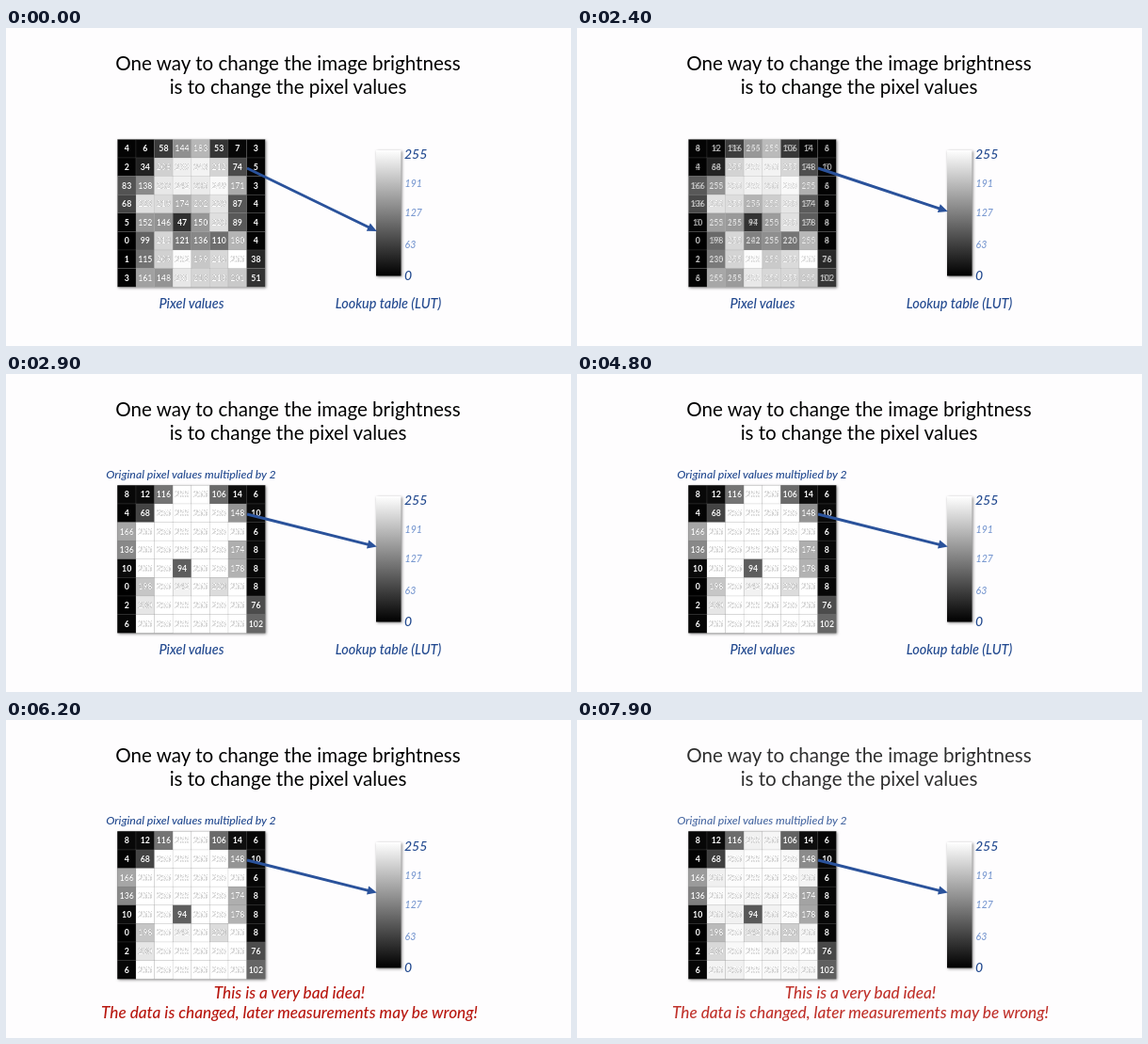
An HTML page for the animation above (8 s loop, 600 by 338 pixels).

```html
<!DOCTYPE html>
<html lang="en">
<head>
<meta charset="utf-8">
<title>Changing pixel values</title>
<style>
  html, body { margin: 0; width: 100%; height: 100%; overflow: hidden; background: #fefdfe; }
  svg { display: block; width: 100vw; height: 100vh; font-family: Lato, "Open Sans", sans-serif; text-anchor: middle; }
  .title { font-size: 20.6px; fill: #000; }
  .blue { font-style: italic; font-weight: 500; fill: #22498f; }
  .caption { font-size: 14.45px; }
  .note { font-size: 12.3px; }
  .scale { text-anchor: start; }
  .end { font-size: 14px; }
  .mid { font-size: 10.6px; fill: #7898d0; }
  .warn { font-size: 17.2px; font-style: italic; font-weight: 500; fill: #b8170f; }
  .digits { font-size: 8.8px; font-weight: 700; fill: #fff; filter: drop-shadow(.4px .6px .6px rgba(0, 0, 0, .7)); }
  .box { filter: drop-shadow(1px 1.5px 1.5px rgba(0, 0, 0, .5)); }
</style>
</head>
<body>
<svg viewBox="0 0 600 338" xmlns="http://www.w3.org/2000/svg">
  <defs>
    <linearGradient id="ramp" x1="0" y1="0" x2="0" y2="1">
      <stop offset="0" stop-color="#fff"/>
      <stop offset="1" stop-color="#000"/>
    </linearGradient>
  </defs>
  <g id="title" class="title">
    <text x="299.5" y="45">One way to change the image brightness</text>
    <text x="299.5" y="69.5">is to change the pixel values</text>
  </g>
  <text id="note" class="blue note" x="196.5" y="110.7">Original pixel values multiplied by 2</text>
  <rect class="box" x="118.4" y="118.4" width="156.8" height="156.8" fill="#fff"/>
  <g id="grid"></g>
  <rect class="box" x="393" y="130" width="26.5" height="133.5" fill="url(#ramp)"/>
  <g class="blue scale">
    <text class="end" x="423" y="138.5">255</text>
    <text class="mid" x="423.5" y="169">191</text>
    <text class="mid" x="423.5" y="200">127</text>
    <text class="mid" x="423.5" y="234">63</text>
    <text class="end" x="423" y="267.5">0</text>
  </g>
  <g id="labels" class="blue caption">
    <text x="197" y="298">Pixel values</text>
    <text x="406" y="298">Lookup table (LUT)</text>
  </g>
  <g id="warn" class="warn">
    <text x="301" y="296">This is a very bad idea!</text>
    <text x="301" y="317.3">The data is changed, later measurements may be wrong!</text>
  </g>
  <g fill="#2a529b" stroke="#2a529b">
    <path id="shaft" fill="none" stroke-width="2.9"/>
    <path id="head" d="M0 0L-10 -4.6V4.6Z" stroke="none"/>
  </g>
</svg>
<script>
const LOOP = 8000, CELL = 19.6, LEFT = 118.4, TOP = 118.4;
const NS = "http://www.w3.org/2000/svg";
const pixels = [
  [4, 6, 58, 144, 183, 53, 7, 3],
  [2, 34, 208, 239, 243, 212, 74, 5],
  [83, 138, 232, 242, 235, 249, 171, 3],
  [68, 223, 219, 174, 202, 229, 87, 4],
  [5, 152, 146, 47, 150, 223, 89, 4],
  [0, 99, 213, 121, 136, 110, 180, 4],
  [1, 115, 209, 252, 199, 216, 255, 38],
  [3, 161, 148, 231, 213, 213, 201, 51]
];
const $ = id => document.getElementById(id);

function add(parent, tag, attrs, text) {
  const el = document.createElementNS(NS, tag);
  for (const key in attrs) el.setAttribute(key, attrs[key]);
  if (text !== undefined) el.textContent = text;
  return parent.appendChild(el);
}

function eachCell(gain, draw) {
  pixels.forEach((row, r) => row.forEach((value, c) =>
    draw(Math.min(255, value * gain), LEFT + c * CELL, TOP + r * CELL)));
}

function addCells(gain) {
  const group = add($("grid"), "g", { stroke: "#888", "stroke-opacity": .25, "stroke-width": .6 });
  eachCell(gain, (v, x, y) =>
    add(group, "rect", { x, y, width: CELL, height: CELL, fill: `rgb(${v},${v},${v})` }));
  return group;
}

function addDigits(gain) {
  const group = add($("grid"), "g", { class: "digits" });
  eachCell(gain, (v, x, y) =>
    add(group, "text", { x: x + CELL / 2, y: y + CELL / 2 + 3.1 }, v));
  return group;
}

const ramp = (t, from, to) => Math.max(0, Math.min(1, (t - from) / (to - from)));
const smooth = p => p * p * (3 - 2 * p);
const fade = (el, value) => el.setAttribute("opacity", value);

function pointArrow(y2) {
  const x1 = 256, y1 = 149, x2 = 393.8;
  const angle = Math.atan2(y2 - y1, x2 - x1);
  const bx = x2 - 8 * Math.cos(angle), by = y2 - 8 * Math.sin(angle);
  $("shaft").setAttribute("d", `M${x1} ${y1}L${bx} ${by}`);
  $("head").setAttribute("transform", `translate(${x2} ${y2}) rotate(${angle * 180 / Math.PI})`);
}

addCells(1);
const newCells = addCells(2), oldDigits = addDigits(1), newDigits = addDigits(2);

function render(t) {
  const change = smooth(ramp(t, 1950, 2700));
  const warn = ramp(t, 4900, 5700);
  const leave = ramp(t, 7840, 8340);
  const text = 1 - 1.5 * leave;
  pointArrow(216 - 32.5 * change);
  fade(newCells, ramp(t, 2370, 2850) * (1 - leave));
  fade(oldDigits, 1 - change);
  fade(newDigits, change);
  fade($("note"), ramp(t, 2420, 2850) * text);
  fade($("labels"), 1 - warn);
  fade($("warn"), warn * (1 - leave));
  fade($("title"), text);
}

const start = performance.now();
function tick() {
  render((performance.now() - start) % LOOP);
  requestAnimationFrame(tick);
}
tick();
</script>
</body>
</html>
```
